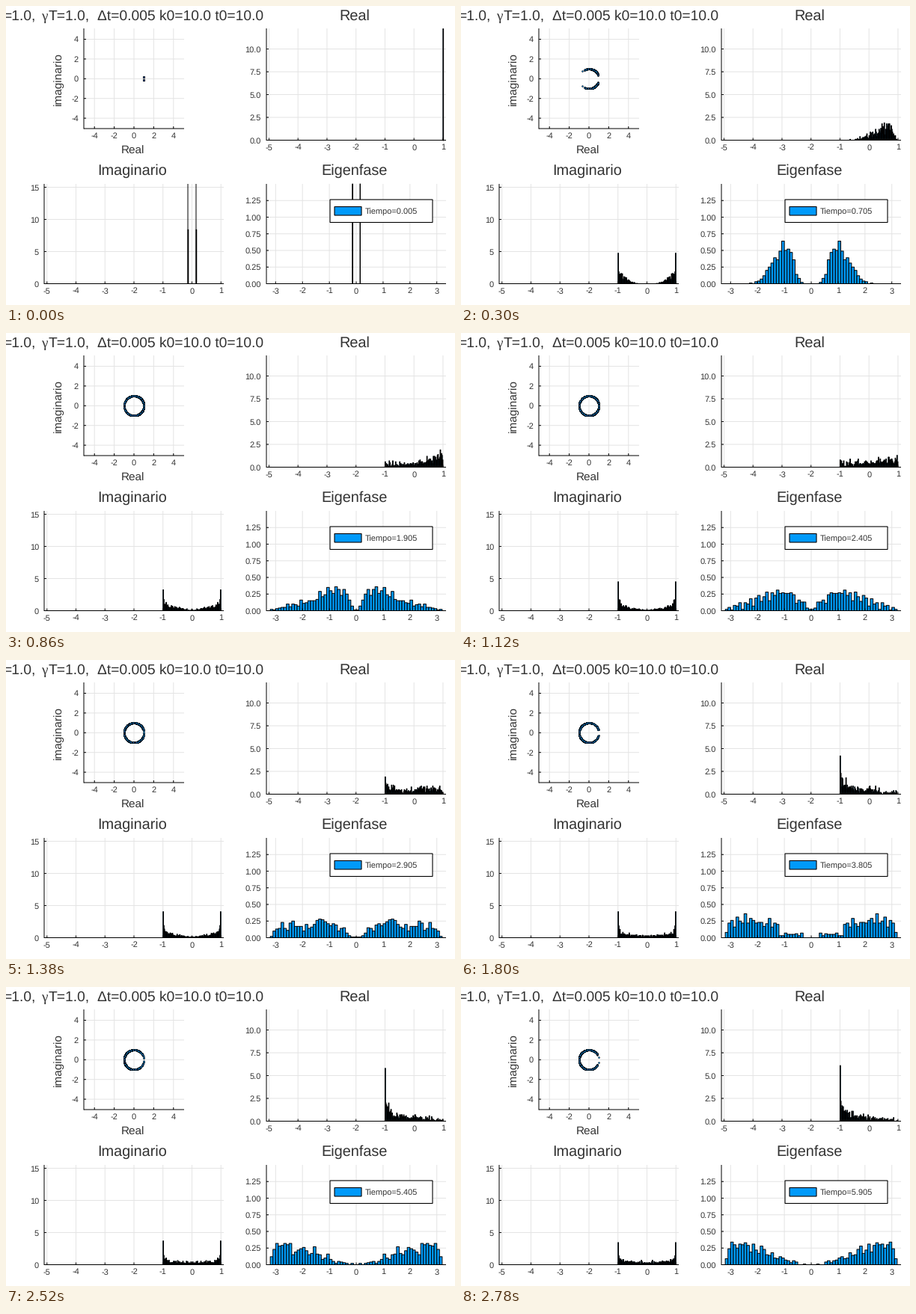
A matplotlib script for the animation above (2.88 s loop, 600x400 px).

```python
import numpy as np
import matplotlib.pyplot as plt
from matplotlib.animation import FuncAnimation
from matplotlib.collections import PolyCollection

W, H, DPI = 600, 400, 100
PX = 72 / DPI
BLUE, INK, GRID = "#009afa", "#333333", "#e4e4e4"

plt.rcParams["font.family"] = "Liberation Sans"
plt.rcParams["text.hinting"] = "none"
fig = plt.figure(figsize=(W / DPI, H / DPI), dpi=DPI, facecolor="white")
ax = fig.add_axes([0, 0, 1, 1])
ax.set_xlim(0, W)
ax.set_ylim(H, 0)
ax.axis("off")


def line(xs, ys, color="black", z=1):
    ax.plot(xs, ys, color=color, lw=PX, zorder=z, snap=False,
            solid_capstyle="butt")


def label(x, y, s, size, ha="center", va="baseline", **kw):
    return ax.text(x, y, s, fontsize=size * PX, ha=ha, va=va,
                   color=INK, zorder=9, **kw)


class Panel:
    """Plot area in stage pixels with a linear data scale."""

    def __init__(self, box, origin, unit, xticks, yticks, fmt):
        self.left, self.top, self.right, self.bottom = box
        self.origin, self.unit = origin, unit
        for v in xticks:
            x = self.x(v)
            line([x, x], [self.top, self.bottom], GRID)
            line([x, x], [self.bottom - 3, self.bottom], z=5)
            label(x, self.bottom + 13, str(v), 11)
        for v in yticks:
            y = self.y(v)
            line([self.left, self.right], [y, y], GRID)
            line([self.left, self.left + 3], [y, y], z=5)
            label(self.left - 7, y + 4, fmt % v, 11, "right")
        line([self.left, self.left], [self.top, self.bottom + .5], z=5)
        line([self.left, self.right], [self.bottom, self.bottom], z=5)
        self.bars = PolyCollection([], facecolors=BLUE, edgecolors="black",
                                   linewidths=PX, zorder=4, snap=False)
        ax.add_collection(self.bars, autolim=False)

    def x(self, v):
        return self.origin[0] + self.unit[0] * v

    def y(self, v):
        return self.origin[1] - self.unit[1] * v

    def set_bars(self, bars):
        rects = []
        for left, width, height in bars:
            if height > 0:
                a, b = self.x(left), self.x(left + width)
                t = max(self.y(height), self.top)
                rects.append([(a, self.bottom), (a, t),
                              (b, t), (b, self.bottom)])
        self.bars.set_verts(rects)

    def histogram(self, values, lo, hi, bins):
        counts, edges = np.histogram(values, bins, (lo, hi))
        width = (hi - lo) / bins
        self.set_bars((e, width, c / (len(values) * width))
                      for e, c in zip(edges, counts))


plane = Panel((104, 30, 238, 164), (171, 97.3), (13.2, 13.2),
              range(-4, 5, 2), range(-4, 5, 2), "%d")
real = Panel((348, 30, 588, 179.5), (545.2, 179.5), (38.75, 12.2),
             range(-5, 2), np.arange(0, 11, 2.5), "%.1f")
imag = Panel((51, 238, 291, 371.5), (248.5, 371.5), (38.75, 8.6),
             range(-5, 2), range(0, 16, 5), "%d")
phase = Panel((348, 238, 588, 371.5), (468, 371.5), (35.9, 89),
              range(-3, 4), np.arange(0, 1.3, .25), "%.2f")

# titles and axis names
label(-4, 18.5, "=1.0,", 19.3, "left")
label(47, 18.5, "γ", 19.3, "left", family="Liberation Serif")
label(56.5, 18.5, "T=1.0,", 19.3, "left")
label(344.5, 18.5, "Δt=0.005 k0=10.0 t0=10.0", 19.3, "right")
label(466, 18.5, "Real", 19.9)
label(169, 225.7, "Imaginario", 19.9)
label(466, 225.7, "Eigenfase", 19.9)
label(169, 197.5, "Real", 15.2)
label(69.5, 98, "imaginario", 15.4, va="center", rotation=90)

# legend
for x, y, w, h, fill in [(433, 259, 137, 30.5, "white"),
                         (439, 268.5, 36, 11.5, BLUE)]:
    ax.add_patch(plt.Rectangle((x, y), w, h, fc=fill, ec="black",
                               lw=1.1 * PX, zorder=8, snap=False))
clock = label(480, 279, "", 11, "left")

dots, = ax.plot([], [], "o", ms=1.8 * PX, mfc=BLUE, mec="black",
                mew=.6 * PX, zorder=6)

# Each phase pair +-theta is drawn from a density theta^a * exp(-theta / b).
# Between key steps the quantiles move linearly.
N = 500
THETA0 = 2 * np.sqrt(.005)
SHAPES = {7: (9, .11), 12: (3, 9), 19: (1.5, .5), 29: (1.7, .8),
          38: (2, 1.35), 49: (2.4, 1.08), 59: (2, 2)}
KEYS = [0, *SHAPES]
GRID_T = np.linspace(0, np.pi, 400)


def quantile(key, u):
    if key == 0:
        return np.full_like(u, THETA0)
    a, b = SHAPES[key]
    cdf = np.cumsum(GRID_T ** a * np.exp(-GRID_T / b))
    return np.interp(u, cdf / cdf[-1], GRID_T)


def phases(step):
    u = np.random.default_rng(100 + step).random(N)
    k = min(np.searchsorted(KEYS, step, "right"), len(KEYS) - 1)
    a, b = KEYS[k - 1], KEYS[k]
    f = (step - a) / (b - a)
    return (1 - f) * quantile(a, u) + f * quantile(b, u)


# each third step is held for five ticks, and so is the last one
STEPS = 60
TICKS = [s for s in range(STEPS)
         for _ in range(5 if s % 3 == 1 or s == STEPS - 1 else 1)]


def draw(tick):
    step = TICKS[tick]
    th = phases(step)
    both = np.concatenate([-th, th])
    dots.set_data(plane.x(np.cos(both)), plane.y(np.sin(both)))
    clock.set_text("Tiempo=%.3f" % (.005 + .1 * step))
    if step == 0:
        # all samples coincide, so the bars shrink to thin lines
        pair = (-THETA0, THETA0)
        real.set_bars([(.985, .02, 99)])
        imag.set_bars([(v, w, h) for v in pair
                       for w, h in ((0, 99), (.02, 8.4))])
        phase.set_bars([(v, .01, 99) for v in pair])
    else:
        real.histogram(np.cos(th), -1, 1, 100)
        imag.histogram(np.sin(both), -1, 1, 100)
        phase.histogram(both, -3.2, 3.2, 64)
    return []


anim = FuncAnimation(fig, draw, frames=len(TICKS), interval=20,
                     init_func=lambda: draw(0), repeat=True, repeat_delay=0,
                     blit=False)
plt.show()
```
